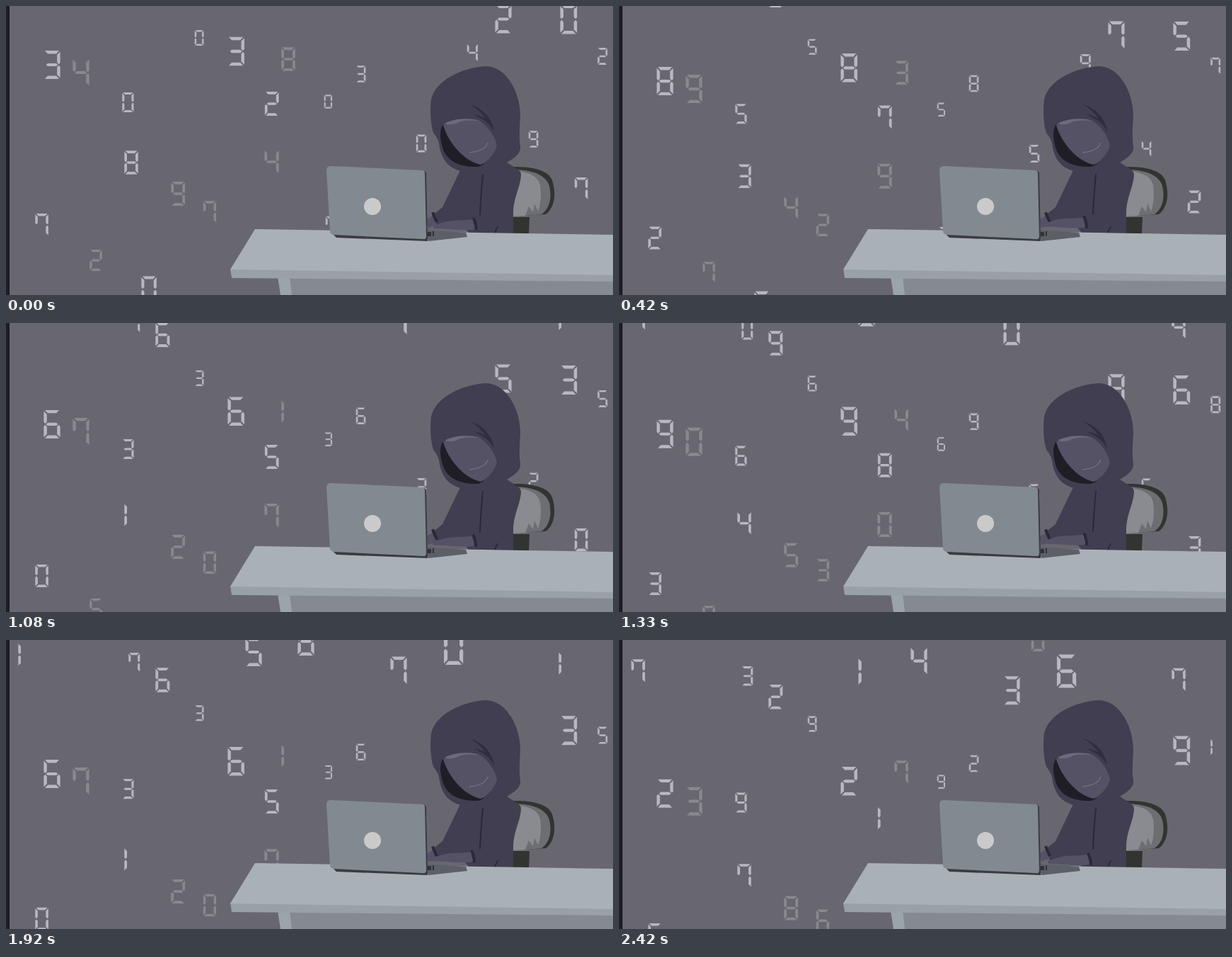
These frames come from a looping animation (858x408 px, 2510 ms). An HTML page:

```html
<!DOCTYPE html>
<html lang="en">
<head>
<meta charset="utf-8">
<title>Typing at night</title>
<style>
html, body { margin: 0; width: 100%; height: 100%; overflow: hidden; background: #686770; }
svg { display: block; width: 858px; height: 408px; }
.skin { fill: #555266; }
.cloth { fill: #403e50; }
.fold { fill: none; stroke: #2a2938; stroke-width: 2; stroke-linecap: round; }
.cuff { fill: none; stroke: #2a2938; stroke-width: 4; }
</style>
</head>
<body>
<svg viewBox="0 0 858 408">
  <rect width="858" height="408" fill="#686770"/>
  <g id="dim" fill="#89888f"></g>
  <g id="bright" fill="#b9b8c0"></g>
  <rect width="5" height="408" fill="#1e1d27"/>

  <g id="chair">
    <path fill="#323431" d="M714 298H740L739 322H714Z"/>
    <path fill="#323431" d="M715 227C742 226 766 231 772 246C778 264 776 284 763 294L716 297Z"/>
    <path fill="#6c6e72" d="M719 231C747 232 763 239 768 254C772 272 768 286 757 294L716 298Z"/>
    <path fill="#898b90" d="M721 233C740 235 752 240 755 253C757 266 756 279 752 290L747 279L745 291L739 283L734 296L716 297Z"/>
  </g>

  <g id="body">
    <path class="cloth" d="M643 230L617 284L602 296L609 311L641 305L655 321H717V290C718 268 728 254 728 237C727 231 716 227 707 220Z"/>
    <path class="fold" d="M674 238Q671 268 670 295M691 321Q692 316 695 312"/>
  </g>

  <g id="head">
    <path class="cloth" d="M678 85C708 85 727 123 727 155C726 172 725 188 727 198C728 207 721 213 711 219C697 229 668 235 643 233C623 228 616 214 613 200C612 190 609 185 604 179C600 167 599 146 601 132C607 105 644 87 678 85Z"/>
    <path fill="#1f1e27" d="M618 167C613 174 613 184 616 196C620 215 635 228 668 227L676 223C653 218 634 197 618 167Z"/>
    <path class="skin" d="M618 168C630 159 650 157 668 161C681 169 691 183 694 197C690 210 681 219 671 224C650 220 626 196 618 168Z"/>
    <path fill="#6d6a7b" d="M621 165Q644 156 669 162Q645 160 638 165Q632 168 623 167Z"/>
    <path fill="#302e3d" d="M656 139C675 145 688 159 690 178C684 164 674 160 661 153Q674 156 678 159Q670 147 656 139Z"/>
    <path fill="none" stroke="#706d7e" stroke-width="1.5" d="M655 207Q677 205 681 193"/>
  </g>

  <g id="desk">
    <path fill="#858a91" d="M400 383L858 386V408H403Z"/>
    <path fill="#9ba4aa" d="M384 382H401L404 408H388Z"/>
    <path fill="#98a1a8" d="M317 371L858 379V389L319 384Z"/>
    <path fill="#a9b1b7" d="M352 315L858 323V380L317 372Z"/>
  </g>

  <path fill="#5c5f66" d="M592 316L650 320L652 326L597 332Z"/>
  <path fill="#303139" d="M596 319H601V325H596ZM603 318H605V325H603Z"/>
  <g id="far">
    <path class="skin" d="M594 302L603 297L609 309L597 314Z"/>
    <path class="cuff" d="M603 292Q606 300 609 306"/>
  </g>
  <g id="near">
    <path class="cloth" d="M659 302L682 298L690 320H666Z"/>
    <path class="skin" d="M604 313L616 309C628 304 646 306 660 304L664 318C646 321 627 317 605 317Z"/>
    <path class="cuff" d="M661 302Q665 310 665 319"/>
  </g>

  <g id="laptop">
    <path fill="#3a3b41" d="M461 321L596 329V332L467 327ZM590 232L594 235L596 331H590Z"/>
    <path fill="#828a91" d="M459 226L588 232Q592 232 592 236L594 325Q594 330 589 329L463 323Q458 322 458 318L453 232Q453 226 459 226Z"/>
    <circle cx="518" cy="283" r="12" fill="#cbcacb"/>
  </g>
</svg>

<script>
const LOOP = 2510, STEP = 250 / 3, LAST = 29;
const FALL = 0.1152; // pixels per step for each pixel of height

// Seven segments on a 24 by 40 cell
const seg = {
  a: 'M2 0H22L18 4.4H6Z',
  b: 'M23.6 1.6V17L21.6 19.2L19.2 16.6V6Z',
  c: 'M23.6 23V38.4L19.2 34V23.4L21.6 20.8Z',
  d: 'M2 40H22L18 35.6H6Z',
  e: 'M.4 23V38.4L4.8 34V23.4L2.4 20.8Z',
  f: 'M.4 1.6V17L2.4 19.2L4.8 16.6V6Z',
  g: 'M3.6 20L6 17.9H18L20.4 20L18 22.1H6Z'
};
const glyphs = 'abcdef fe abged abgcd fgbc afgcd afgedc fabc abcdefg abfgcd'
  .split(' ').map(s => [...s].map(k => seg[k]).join(''));

// left, middle, height, first digit
const bright = [
  [53, 83, 40, 3], [164, 136, 28, 0], [167, 221, 33.5, 8], [41, 309, 32, 7],
  [191, 400, 37, 0], [266.5, 45, 22, 0], [313, 64, 40.5, 3], [494.5, 96, 23.5, 3],
  [365.5, 138, 34, 2], [449.5, 135, 19.5, 0], [579.5, 194, 25, 0], [738.5, 188, 23.5, 9],
  [803.5, 258, 32, 7], [651.5, 66, 26, 4], [691, 18.5, 40, 2], [783, 19, 41, 0],
  [836, 71, 24, 2], [211, -35, 34.5, 3], [173, -41, 27.5, 4], [17, -68, 33.5, 8],
  [338, -89, 40, 2], [412, -104, 40, 5], [543, -62.5, 40, 4], [618.5, -113, 47, 7],
  [781, -55.5, 33.5, 8], [451.5, 310, 26, 7]
];
const dim = [
  [94, 94, 40, 4], [233, 265, 34, 9], [278.5, 291, 31.5, 7], [118, 359, 30, 2],
  [389, 75, 33.5, 8], [365, 220, 35, 4], [582.5, -107, 32, 1]
];

// Step and lift of the near hand
const lifts = [[0, .2], [5, .5], [8, 1], [13, .25], [19, .7], [26, .25], [29, 0]];

const byId = id => document.getElementById(id);
const near = byId('near'), far = byId('far');

function build(list, id) {
  return list.map(([x, y, h, digit]) => {
    const el = document.createElementNS('http://www.w3.org/2000/svg', 'path');
    byId(id).append(el);
    return { el, x, y, h, digit };
  });
}
const digits = [...build(dim, 'dim'), ...build(bright, 'bright')];

function liftAt(n) {
  const i = Math.max(1, lifts.findIndex(k => k[0] >= n));
  const [n0, v0] = lifts[i - 1], [n1, v1] = lifts[i];
  const u = (n - n0) / (n1 - n0);
  return v0 + (v1 - v0) * u * u * (3 - 2 * u);
}

function draw(n) {
  for (const { el, x, y, h, digit } of digits) {
    const top = y - h / 2 + n * h * FALL;
    el.setAttribute('d', glyphs[(digit + n) % 10]);
    el.setAttribute('transform', `translate(${x} ${top}) scale(${h / 40})`);
  }
  const p = liftAt(n);
  near.setAttribute('transform', `translate(${2 - 12 * p} ${-1 - 9 * p})`);
  far.setAttribute('transform', `translate(0 ${-1 + p})`);
}

let shown = -1;
const start = performance.now();
function tick() {
  const t = (performance.now() - start) % LOOP;
  const n = Math.min(LAST, Math.floor((t + 5) / STEP));
  if (n !== shown) draw(shown = n);
  requestAnimationFrame(tick);
}
tick();
</script>
</body>
</html>
```
